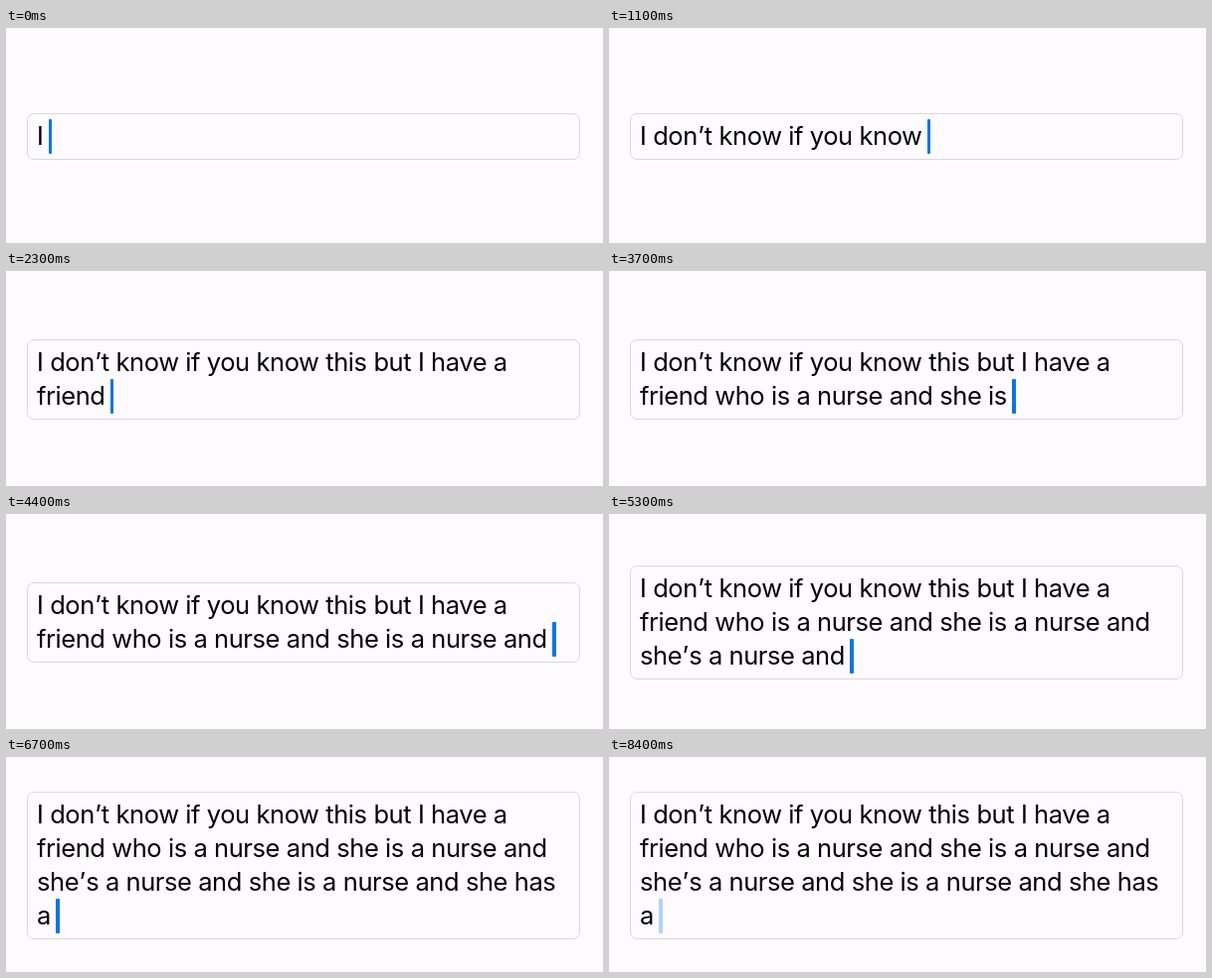
These frames come from a looping animation (600x217 px, 8500 ms). An HTML page:

```html
<!DOCTYPE html>
<html lang="en">
<head>
<meta charset="utf-8">
<title>Dictation</title>
<style>
  html, body {
    margin: 0;
    width: 100%;
    height: 100%;
    overflow: hidden;
    background: #fdfbfe;
  }
  #field {
    position: absolute;
    left: 21px;
    width: 556px;
    box-sizing: border-box;
    padding: 5px 9px;
    border: 1px solid #d9d8dc;
    border-radius: 7px;
    color: #000;
    font: 400 25.5px/34px Inter, "Liberation Sans", sans-serif;
    font-optical-sizing: none;
    letter-spacing: -0.0167em;
    white-space: pre;
  }
  .mark {
    font-kerning: none;
    padding: 0 0.015em;
  }
  #caret {
    position: absolute;
    margin-left: 5.4px;
    width: 3.5px;
    height: 35px;
    border-radius: 1px;
    background: #0a74ee;
  }
</style>
</head>
<body>
<div id="field"><span id="text"></span><span id="caret"></span></div>
<script>
const LOOP = 8500, TICK = 100;
const LINE = 34, FRAME = 13, MIDDLE = 109.5;
const BLINK_START = 7200, BLINK_PERIOD = 1200;
const BLINK = [0.3, 0, 0, 0, 0.3, 0.75];

// Each phrase: first word time, last word time, words (a newline wraps the line).
const phrases = [
  [0, 0, "I"],
  [100, 400, "don’t know"],
  [700, 1700, "if you know this but I"],
  [1800, 2700, "have a \nfriend who is"],
  [3000, 3900, "a nurse and she is a"],
  [4100, 4500, "nurse and \nshe’s"],
  [4900, 5800, "a nurse and she is a"],
  [6000, 6700, "nurse and she has \na"]
];

const snap = ms => Math.round(ms / TICK) * TICK;

const words = phrases.flatMap(([from, to, phrase]) => {
  const list = phrase.split(" ");
  const gap = (to - from) / Math.max(1, list.length - 1);
  return list.map((word, i) => ({ word, at: snap(from + i * gap) }));
});

const field = document.getElementById("field");
const text = document.getElementById("text");
const caret = document.getElementById("caret");

function spokenBy(t) {
  return words.filter(w => w.at <= t)
    .map(w => w.word)
    .join(" ")
    .replace(/ \n/g, "\n");
}

function caretOpacity(t) {
  if (t < BLINK_START) return 1;
  const step = Math.floor((t - BLINK_START) % BLINK_PERIOD / TICK);
  return BLINK[step] ?? 1;
}

function draw(t) {
  const spoken = spokenBy(t);
  if (text.textContent !== spoken) {
    // Apostrophes get a little room on both sides.
    text.innerHTML = spoken.replace(/’/g, '<span class="mark">’</span>');
  }
  const height = FRAME + LINE * spoken.split("\n").length;
  field.style.height = height + "px";
  field.style.top = MIDDLE - height / 2 + "px";
  caret.style.opacity = caretOpacity(t);
}

function frame() {
  draw(performance.now() % LOOP);
  requestAnimationFrame(frame);
}
frame();
</script>
</body>
</html>
```
